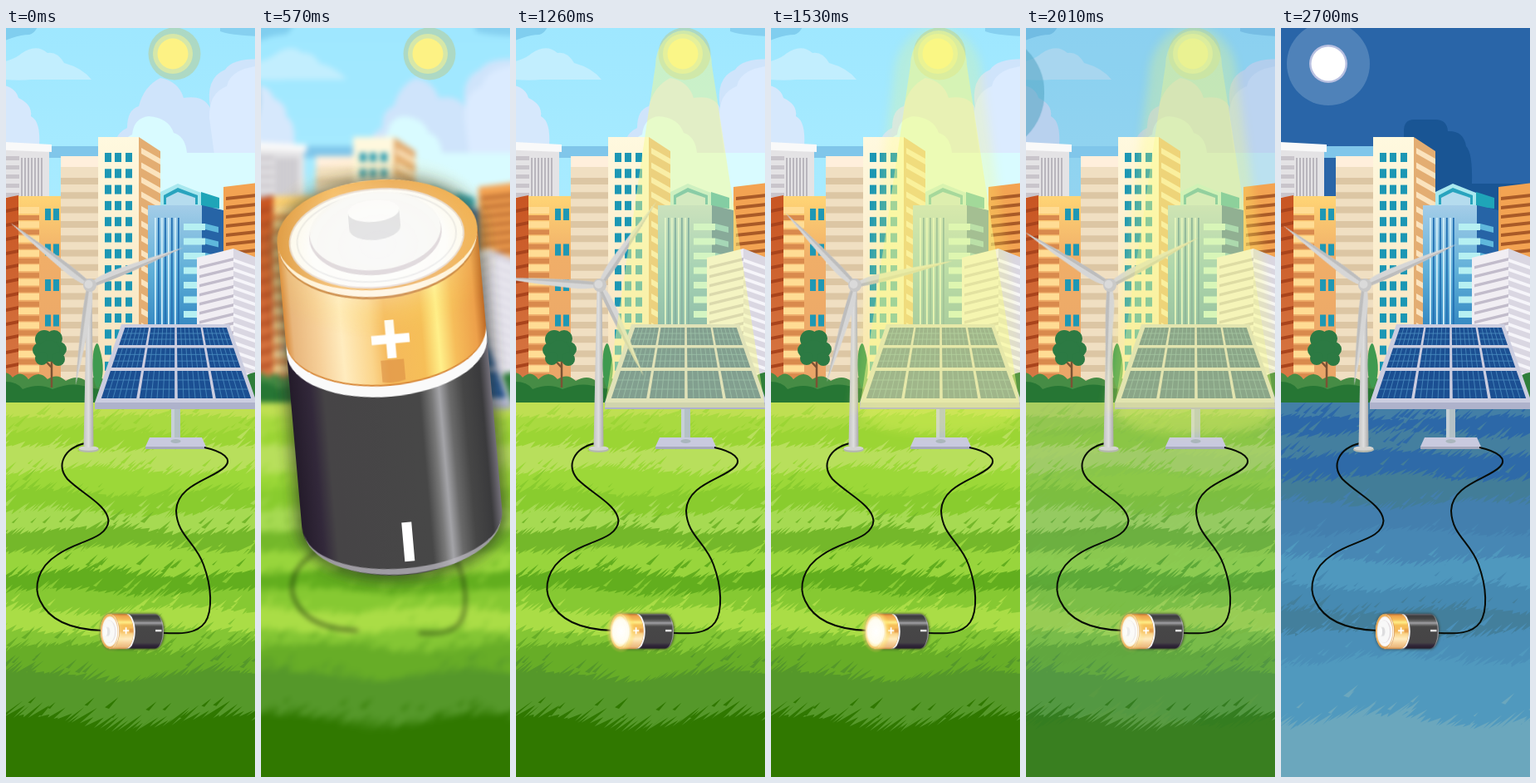
Write an HTML page that moves like this. It is 300x900 px and loops after 2730 ms.

```html
<!DOCTYPE html>
<html lang="en">
<head>
<meta charset="utf-8">
<title>Charged by sun and wind</title>
<style>
html, body { margin: 0; width: 100%; height: 100%; overflow: hidden; background: #a0e8ff; }
svg { position: absolute; left: 0; top: 0; width: 300px; height: 900px; overflow: visible; }
#scene, #beam, .anim { animation: 2730ms linear infinite; }
#scene { animation-name: focus; }
#rotor { animation-name: spin; }
#cell { animation-name: zoom; }
#charge { animation-name: charge; }
#beam { animation-name: reveal; }
#ray { animation-name: ray; }
#haze { animation-name: haze; }
#sun { animation-name: sunset; }
.night { animation-name: night; }
#cloud { animation-name: cloud; }
#moon { animation-name: moonrise; }
#ring { animation-name: ring; }

@keyframes focus {
  0%, 34%, 100% { filter: blur(0); }
  16%, 22% { filter: blur(3px); }
}
@keyframes zoom {
  0%, 34%, 100% { transform: translate(152px, 725px) rotate(-90deg) scale(.172, .16); animation-timing-function: ease-in-out; }
  18%, 22% { transform: translate(155px, 420px) rotate(-5deg) scale(1, 1); animation-timing-function: ease-in-out; }
}
@keyframes spin {
  0% { transform: rotate(-22deg); }
  35.16% { transform: rotate(38deg); animation-timing-function: cubic-bezier(.33, .27, .67, .52); }
  46.15% { transform: rotate(64deg); animation-timing-function: cubic-bezier(.33, .23, .67, .6); }
  65.93% { transform: rotate(160deg); animation-timing-function: cubic-bezier(.33, .29, .67, .715); }
  82.42% { transform: rotate(270.5deg); animation-timing-function: cubic-bezier(.33, .5, .67, .85); }
  100% { transform: rotate(338deg); }
}
@keyframes charge {
  0%, 21% { opacity: .25; }
  35% { opacity: .7; }
  46%, 68% { opacity: 1; }
  79%, 100% { opacity: 0; }
}
@keyframes reveal {
  0%, 33.8% { clip-path: inset(0 0 900px 0); }
  45%, 100% { clip-path: inset(0 0 396px 0); }
}
@keyframes ray {
  0%, 46% { opacity: .47; }
  64%, 70% { opacity: .52; }
  80%, 100% { opacity: 0; }
}
@keyframes haze {
  0%, 47% { opacity: 0; }
  65%, 70% { opacity: .42; }
  80%, 100% { opacity: 0; }
}
@keyframes sunset { 0%, 71% { opacity: 1; } 80%, 100% { opacity: 0; } }
@keyframes night { 0%, 71% { opacity: 0; } 86.5%, 100% { opacity: 1; } }
@keyframes cloud { 0%, 82.4% { opacity: 0; } 97%, 100% { opacity: 1; } }
@keyframes moonrise {
  0%, 71.4% { transform: translate(-75px, 86px); animation-timing-function: cubic-bezier(.33, .4, .67, .8); }
  82.42% { transform: translate(24px, 53px); animation-timing-function: cubic-bezier(.2, .5, .6, 1); }
  99%, 100% { transform: translate(57px, 43px); }
}
@keyframes ring { 0%, 82.4% { opacity: 1; } 95%, 100% { opacity: 0; } }
</style>
</head>
<body>
<svg id="scene" viewBox="0 0 300 900">
  <defs>
    <linearGradient id="skyFill" x2="0" y2="1"><stop stop-color="#9ee7ff"/><stop offset=".45" stop-color="#a8ebff"/><stop offset="1" stop-color="#dcf8fc"/></linearGradient>
    <linearGradient id="towerFill"><stop stop-color="#c2c2c2"/><stop offset=".5" stop-color="#dedede"/><stop offset="1" stop-color="#aaa"/></linearGradient>
    <linearGradient id="brickFill" x2="0" y2="1"><stop stop-color="#ffd475"/><stop offset=".3" stop-color="#f0ae68"/><stop offset="1" stop-color="#e9a468"/></linearGradient>
    <linearGradient id="sideFill" x2="0" y2="1"><stop stop-color="#c85522"/><stop offset="1" stop-color="#d97c48"/></linearGradient>
    <linearGradient id="ivoryFill" x2="0" y2="1"><stop stop-color="#fff9df"/><stop offset="1" stop-color="#f6dfb8"/></linearGradient>
    <linearGradient id="glassFill" x2="0" y2="1"><stop stop-color="#a4cde8"/><stop offset=".5" stop-color="#5fafd8"/><stop offset="1" stop-color="#2c80bd"/></linearGradient>
  </defs>
  <g id="sky"></g>
  <rect class="anim night" x="-20" y="-20" width="340" height="260" fill="#2965a8"/>
  <path id="cloud" class="anim" d="M148 200V124Q148 110 160 110H186Q200 110 201 124Q220 123 223 142Q231 150 230 187H300V230H148Z" fill="#195594"/>
  <g id="moon" class="anim">
    <circle id="ring" class="anim" r="73" fill="#53a4c4" fill-opacity=".55"/>
    <circle r="50" fill="#8fb2d4" fill-opacity=".38"/>
    <circle r="23" fill="#b7bfe0"/><circle r="20.5" fill="#fff"/>
  </g>
  <g id="city"></g>
  <g id="meadow"></g>
  <g id="dusk" class="anim night"></g>
  <g id="plants"></g>
  <g id="panel"></g>
  <g fill="none" stroke="#070b05" stroke-width="2">
    <path d="M95 499C70 505 60 525 74 542C92 560 122 573 123.500 592C122 615 85 616 62 633C38 648 33 672 41 688C52 712 80 723 117 724"/>
    <path d="M239 504C262 509 273 518 264 527C250 542 206 548 205 580C206 610 228 617 238 645C248 672 249 700 240 714C230 728 212 728 190 727"/>
  </g>
  <g id="turbine">
    <ellipse cx="99.500" cy="506.500" rx="12.500" ry="3.500" fill="#b5b8ae"/>
    <ellipse cx="99.500" cy="505" rx="12" ry="2.800" fill="#d4d4d2"/>
    <path d="M97.500 312H103.500L105.500 502Q99 506 93.500 502Z" fill="url(#towerFill)"/>
    <g transform="translate(101 309)">
      <g id="rotor" class="anim"></g>
      <circle r="8" fill="#c9c9c9"/><circle cx="-1.500" cy="-1" r="5" fill="#dadada"/>
    </g>
  </g>
</svg>

<svg viewBox="0 0 300 900">
  <g id="sun" class="anim">
    <circle cx="203" cy="31" r="31.500" fill="#b9c98a" opacity=".5"/>
    <circle cx="201" cy="31" r="24" fill="#e5eca0" opacity=".75"/>
    <circle cx="201" cy="31" r="18.500" fill="#fdf284"/>
  </g>
</svg>

<svg id="beam" viewBox="0 0 300 900">
  <defs><filter id="soft" x="-20%" y="-20%" width="140%" height="140%"><feGaussianBlur stdDeviation="6"/></filter></defs>
  <g id="haze" class="anim" filter="url(#soft)" fill="#fdff6a">
    <path d="M148 60A53 62 0 0 1 254 60L312 460H96Z"/>
    <ellipse cx="204" cy="468" rx="92" ry="20"/>
  </g>
  <path id="ray" class="anim" d="M168 45A34 42 0 0 1 236 45L300 456H107Z" fill="#f8fb8c"/>
</svg>

<svg viewBox="0 0 300 900">
  <defs>
    <linearGradient id="gold">
      <stop stop-color="#d98a3a"/><stop offset=".04" stop-color="#e8b67c"/><stop offset=".16" stop-color="#f6cf98"/>
      <stop offset=".28" stop-color="#ffecbf"/><stop offset=".42" stop-color="#fbd58c"/><stop offset=".5" stop-color="#f5b95c"/>
      <stop offset=".68" stop-color="#f6bf58"/><stop offset=".76" stop-color="#fff08a"/><stop offset=".84" stop-color="#f6bd5a"/>
      <stop offset=".95" stop-color="#eda04a"/><stop offset="1" stop-color="#bd6a25"/>
    </linearGradient>
    <linearGradient id="dark">
      <stop stop-color="#241b2a"/><stop offset=".1" stop-color="#32283a"/><stop offset=".17" stop-color="#464446"/>
      <stop offset=".64" stop-color="#474747"/><stop offset=".7" stop-color="#777"/><stop offset=".74" stop-color="#a4a4a8"/>
      <stop offset=".79" stop-color="#6a6a6a"/><stop offset=".86" stop-color="#464646"/><stop offset=".95" stop-color="#3a3a3c"/><stop offset="1" stop-color="#74707a"/>
    </linearGradient>
    <linearGradient id="rim"><stop stop-color="#dc9440"/><stop offset=".3" stop-color="#f4b65e"/><stop offset=".6" stop-color="#e9a34c"/><stop offset="1" stop-color="#f0ad52"/></linearGradient>
    <radialGradient id="flash">
      <stop stop-color="#fff"/><stop offset=".55" stop-color="#fffdf0" stop-opacity=".95"/>
      <stop offset=".75" stop-color="#ffe98a" stop-opacity=".6"/><stop offset="1" stop-color="#ffd840" stop-opacity="0"/>
    </radialGradient>
    <filter id="shade" x="-20%" y="-20%" width="140%" height="140%"><feGaussianBlur stdDeviation="9"/></filter>
  </defs>
  <g id="cell" class="anim">
    <path d="M-126 -170A126 72 0 0 1 126 -170V172A126 72 0 0 1 -126 172Z" fill="#2a2f20" opacity=".65" filter="url(#shade)"/>
    <path d="M-121 -170V170A121 68 0 0 0 121 170V-170Z" fill="url(#dark)"/>
    <path d="M-119 176A119 61 0 0 0 119 176A119 54 0 0 1 -119 176Z" fill="#bbb8c0" opacity=".75"/>
    <path d="M-121 -170V-38A121 61 0 0 0 121 -38V-170Z" fill="#fafafa"/>
    <path d="M-121 -170V-52A121 62 0 0 0 121 -52V-170Z" fill="#d8893a"/>
    <path d="M-121 -170V-54A121 62 0 0 0 121 -54V-170Z" fill="url(#gold)"/>
    <ellipse cy="-166" rx="120" ry="71" fill="#c47a34"/>
    <ellipse cy="-168" rx="120" ry="70" fill="#fff4e2"/>
    <ellipse cy="-172" rx="121" ry="66" fill="url(#rim)"/>
    <ellipse cx="-1" cy="-168" rx="105" ry="59" fill="#fdfdfd" stroke="#e5d8d4" stroke-width="2"/>
    <ellipse cx="-1" cy="-169" rx="96" ry="53" fill="none" stroke="#e9e9ec" stroke-width="2"/>
    <ellipse cx="-2" cy="-173" rx="80" ry="49" fill="#d8d0d6"/>
    <ellipse cx="-2" cy="-177" rx="79" ry="47" fill="#f8f8f8"/>
    <path d="M-33 -201V-181A31 15 0 0 0 29 -181V-201Z" fill="#dcdcde"/>
    <ellipse cx="-2" cy="-201" rx="31" ry="13" fill="#fcfcfc"/>
    <path d="M-9 -21H19V4Q5 8 -9 5Z" fill="#d88a42" opacity=".55"/>
    <path d="M5 -69V-23M-18 -46H28" stroke="#fff" stroke-width="11"/>
    <path d="M5 175V222" stroke="#fff" stroke-width="12"/>
    <ellipse id="charge" class="anim" cy="-160" rx="150" ry="112" fill="url(#flash)"/>
  </g>
</svg>

<script>
const put = (id, html) => { document.getElementById(id).innerHTML = html; };
const rect = (x, y, w, h, fill) => `<rect x="${x}" y="${y}" width="${w}" height="${h}" fill="${fill}"/>`;
const poly = (pts, fill) => `<polygon points="${pts}" fill="${fill}"/>`;
const path = (d, fill) => `<path d="${d}" fill="${fill}"/>`;
const line = (d, color, w) => `<path d="${d}" fill="none" stroke="${color}" stroke-width="${w}"/>`;
const blob = (x, y, r, fill) => `<circle cx="${x}" cy="${y}" r="${r}" fill="${fill}"/>`;
const repeat = (n, fn) => Array.from({ length: n }, (_, i) => fn(i)).join('');
const lerp = (a, b, u) => a + (b - a) * u;
// Slanted bars stacked down a facade
const bars = (n, x1, y1, x2, y2, step, h, fill) => repeat(n, i =>
  poly(`${x1},${y1 + i * step} ${x2},${y2 + i * step} ${x2},${y2 + h + i * step} ${x1},${y1 + h + i * step}`, fill));
const panes = (xs, w, h, y, step, n, fill) => xs.map(x => repeat(n, i => rect(x, y + i * step, w, h, fill))).join('');

let seed = 7;
const rnd = () => (seed = (seed * 16807) % 2147483647) / 2147483647;

put('sky',
  rect(-20, -20, 340, 500, 'url(#skyFill)') +
  path('M-20 -20H42Q40 5 28 8Q10 8 -20 24Z', '#80ceef') +
  path('M-20 44Q8 40 18 31Q36 18 50 30Q62 28 70 42Q92 48 103 62H30Q10 64 -20 60Z', '#c2eefe') +
  path('M-20 68Q10 66 15 84Q32 92 30 106Q42 112 40 142H-20Z', '#d6e8fc') +
  path('M258 -20V4Q275 10 320 10V-20Z', '#86d0f0') +
  path('M135 150Q126 130 146 120Q146 98 160 94Q166 70 186 60Q208 64 214 84Q238 80 246 96Q240 60 264 50Q274 34 320 38V200H135Z', '#cfe4fb') +
  path('M245 108Q244 78 266 70Q270 46 320 44V160H252Z', '#dbebff') +
  path('M138 165Q136 134 152 128Q154 108 172 106Q196 108 202 126Q216 130 218 150H320V260H138Z', '#d9fbff'));

put('city',
  rect(52, 142, 60, 14, '#80c6ea') +
  // white block
  rect(-20, 146, 72, 70, '#e4e3e5') + poly('-20,136 55,140 55,149 -20,146', '#f9f9f9') +
  bars(5, -20, 154, 16, 154, 11, 5, '#c9c5cb') + repeat(7, i => rect(18 + i * 4, 156, 2, 46, '#b9b6bd')) +
  // brick block
  rect(14, 202, 53, 250, 'url(#brickFill)') + poly('-20,208 15,201 15,452 -20,452', 'url(#sideFill)') +
  bars(14, -20, 222, 15, 215, 17, 4, '#a9441c') + bars(14, 15, 215, 40, 215, 17.3, 8, '#ffdc94') +
  bars(14, 15, 225, 40, 225, 17.3, 6, '#d98a4d') + panes([47, 57], 7, 14, 217, 42.5, 4, '#1f98b4') +
  // beige block
  rect(66, 154, 46, 296, '#f0dfc2') + rect(66, 154, 46, 13, '#ffefdc') +
  bars(15, 66, 180, 112, 180, 17.3, 8, '#dcc6a4') +
  // tower
  poly('160,131 186,148 186,450 160,450', '#e3ad72') + bars(15, 163, 144, 186, 157, 17.5, 7, '#fbe3bd') +
  rect(111, 131, 49, 320, 'url(#ivoryFill)') + panes([119, 131, 144], 8, 11, 150, 19.3, 14, '#1c97b4') +
  // glass block
  poly('235,197 257,204 257,217 235,215', '#1fa5b8') + poly('186,197 207,187 235,198 235,215 186,215', '#a9e8ef') +
  poly('190,201 207,192 231,201 231,212 190,212', '#29a4be') + poly('193,204 207,197 228,204 228,214 193,214', '#b5dcee') +
  poly('236,213 262,219 262,370 236,370', '#2664a6') + rect(171, 213, 65, 160, 'url(#glassFill)') +
  bars(8, 214, 235, 240, 235, 17.5, 8, '#b6f0f2') + bars(8, 240, 235, 256, 239, 17.5, 7, '#5fb8dc') +
  repeat(8, i => rect(179 + i * 4, 228, 1.8, 130, i % 2 ? '#2470b4' : '#d0edf8')) +
  // right blocks
  poly('262,191 320,184 320,380 262,380', '#f3a352') + bars(12, 265, 203, 320, 197, 11, 4, '#a95a27') +
  poly('230,276 274,265 274,450 230,450', '#f1eef3') + poly('274,265 320,283 320,450 274,450', '#dad7e2') +
  bars(14, 233, 286, 274, 276, 11, 3.5, '#c2bccb') + bars(14, 274, 277, 320, 293, 11, 4, '#f6f5fa'));

// A meadow is a stack of bands whose upper edges are ragged with slanted blades
function ragged(y, amp, fill) {
  let d = `M-30 930V${y}`, tufts = '';
  const phase = rnd() * 6;
  for (let x = -30; x < 325;) {
    const base = y + Math.sin(x / 38 + phase) * amp * .45;
    const step = 3 + rnd() * 9, reach = rnd() * amp;
    d += `L${(x + step + reach * 1.2).toFixed(1)} ${(base - reach).toFixed(1)}L${(x + step).toFixed(1)} ${(base + rnd() * 4).toFixed(1)}`;
    if (rnd() < .45) {
      const ty = base + (rnd() - .7) * amp * 2, len = 6 + rnd() * 12;
      tufts += `M${x.toFixed(1)} ${ty.toFixed(1)}l${len.toFixed(1)} ${(-len * .75).toFixed(1)}l${(-len * .7).toFixed(1)} ${(len * .85).toFixed(1)}z`;
    }
    x += step;
  }
  return path(d + 'L340 930Z' + tufts, fill);
}
const meadow = (ground, bands) => rect(-20, 450, 340, 480, ground) + bands.map(b => ragged(...b)).join('');

put('meadow', meadow('#bfdf52', [
  [466, 5, '#a9da40'], [484, 8, '#9bd534'], [505, 8, '#b8df5c'], [532, 9, '#9cd838'], [558, 9, '#89cc2e'],
  [582, 9, '#a6da52'], [603, 9, '#74b82a'], [626, 9, '#98d53c'], [655, 10, '#62ae1e'], [678, 9, '#86c932'],
  [700, 9, '#aadd46'], [725, 9, '#84c634'], [745, 12, '#67ad27'], [778, 14, '#55982a'], [834, 20, '#307800']]));
put('dusk', meadow('#437fa6', [
  [468, 5, '#2c68a8'], [488, 8, '#447f9f'], [512, 9, '#2e6aa8'], [540, 9, '#427d98'], [572, 9, '#437fae'],
  [606, 9, '#4787b4'], [640, 9, '#4f98be'], [672, 9, '#468ab2'], [700, 8, '#437f9c'], [728, 9, '#4a8fb8'],
  [760, 12, '#5099be'], [832, 18, '#6ba7bd']]));

put('plants',
  path('M-20 450V418Q0 408 8 420Q18 410 27 422Q40 410 50 422Q62 414 72 424Q86 416 96 424Q112 414 125 428V450Z', '#468c45') +
  path('M-20 450V428Q10 420 20 434Q40 426 56 434Q80 424 100 432L125 436V450Z', '#267634') +
  path('M284 450V424Q288 412 320 412V450Z', '#2f7e3a') +
  line('M55 432V385M55 408L44 396M55 402L66 392', '#7a5334', 2.5) +
  [[46, 374, 11], [58, 373, 10], [41, 387, 9], [64, 386, 9], [52, 388, 13], [43, 397, 8], [63, 398, 8]]
    .map(c => blob(...c, '#2c7a43')).join('') +
  path('M109 432Q101 412 106 386Q110 372 113 386Q121 412 112 432Z', '#3f9a50'));

// Solar panel in perspective
const rows = [[360, 381], [384.5, 408], [412, 445]];
const at = (u, y) => {
  const v = (y - 360) / 85;
  return `${lerp(lerp(142, 113, v), lerp(267, 297, v), u).toFixed(1)} ${y}`;
};
const cells = rows.map(([a, b]) => repeat(4, c => {
  const l = c / 4 + .01, r = (c + 1) / 4 - .01;
  const uprights = repeat(5, i => { const u = lerp(l, r, (i + 1) / 6); return `M${at(u, a)}L${at(u, b)}`; });
  const levels = repeat(2, i => { const y = lerp(a, b, (i + 1) / 3); return `M${at(l, y)}L${at(r, y)}`; });
  return path(`M${at(l, a)}L${at(r, a)}L${at(r, b)}L${at(l, b)}Z`, '#1b4f92') + line(uprights + levels, '#4c8fc0', .8);
})).join('');
put('panel',
  rect(199, 455, 11, 43, '#b4c1c6') + rect(199, 455, 4, 43, '#c7d0d6') +
  poly('173,492 236,492 241,503 168,503', '#c9cadf') + rect(168, 503, 73, 3, '#a6a9bd') +
  '<ellipse cx="204.500" cy="496.500" rx="6" ry="2.500" fill="#aab6bd"/>' +
  poly('139,356 269,356 302,450 107,450', '#cbcde0') + poly('107,450 302,450 302,458 107,458', '#aeb2cb') + cells);

put('rotor', repeat(3, i => `<g transform="rotate(${i * 120})">` +
  path('M3 -3Q18 -7 34 -6Q80 -4 121 0Q80 3 34 4Q16 4 3 3Z', '#d6d6d6') +
  path('M3 0Q50 0 121 0Q80 3 34 4Q16 4 3 3Z', '#bdbdbd') + '</g>'));
</script>
</body>
</html>
```
